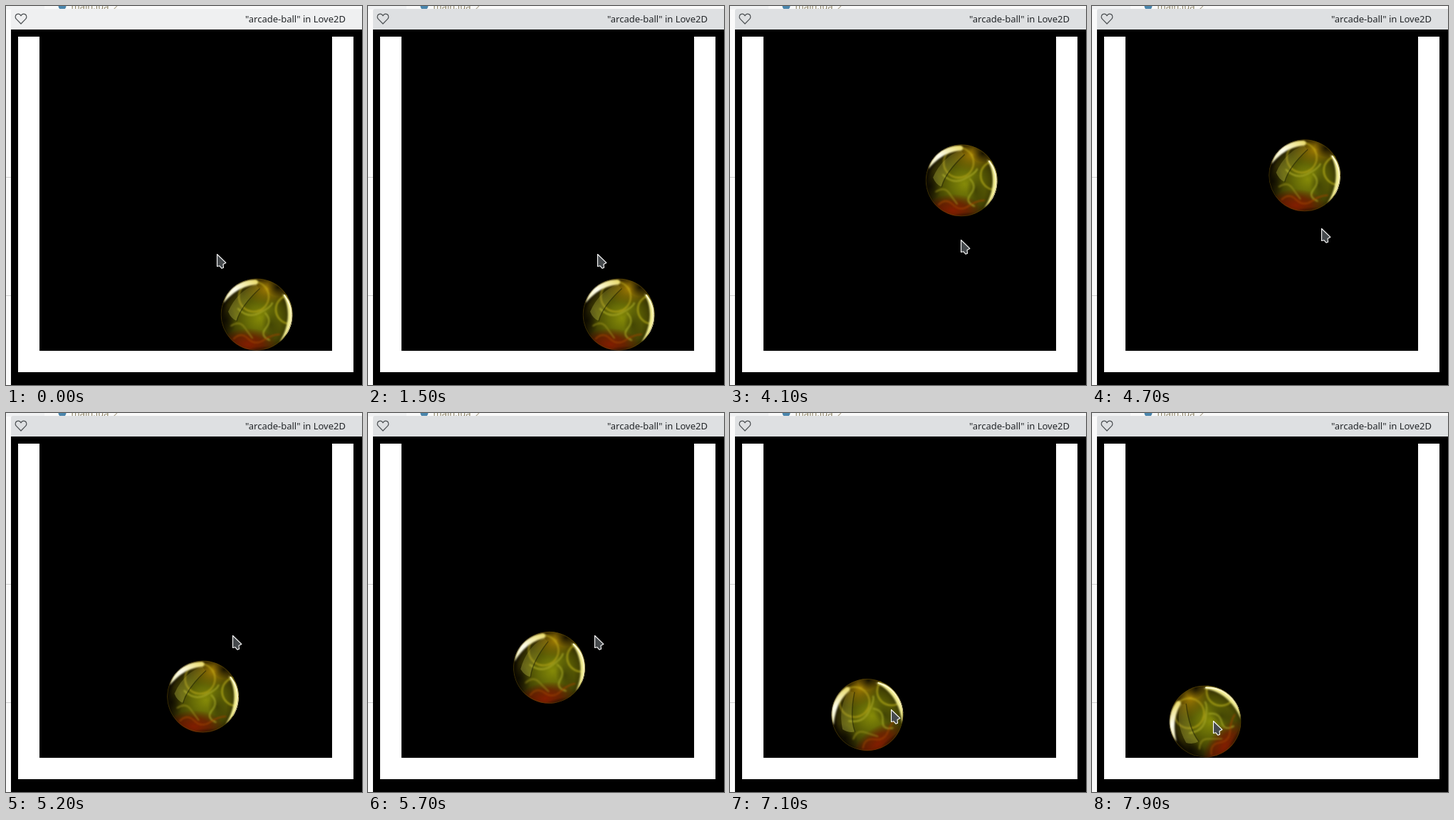
An HTML page for the animation above (8000 ms loop, 500 by 532 pixels).

```html
<!DOCTYPE html>
<html lang="en">
<head>
<meta charset="utf-8">
<title>arcade-ball</title>
<style>
  html, body { margin: 0; width: 100%; height: 100%; overflow: hidden; background: #fafafa; }
  svg { display: block; width: 500px; height: 532px; }
  text { font: 13px "Noto Sans", "Open Sans", sans-serif; white-space: pre; }
  .line { fill: none; stroke-linecap: round; }
</style>
</head>
<body>
<svg viewBox="0 0 500 532" xmlns="http://www.w3.org/2000/svg">
  <defs>
    <radialGradient id="glass" cx="54%" cy="55%" r="52%">
      <stop offset="0" stop-color="#858a08"/>
      <stop offset=".35" stop-color="#666b06"/>
      <stop offset=".7" stop-color="#454503"/>
      <stop offset=".92" stop-color="#2a2502"/>
      <stop offset="1" stop-color="#120e00"/>
    </radialGradient>
    <radialGradient id="red">
      <stop offset="0" stop-color="#861c00" stop-opacity=".95"/>
      <stop offset=".5" stop-color="#701800" stop-opacity=".75"/>
      <stop offset="1" stop-color="#601400" stop-opacity="0"/>
    </radialGradient>
    <radialGradient id="gold">
      <stop offset="0" stop-color="#b98d05" stop-opacity=".85"/>
      <stop offset="1" stop-color="#8a6500" stop-opacity="0"/>
    </radialGradient>
    <radialGradient id="dark">
      <stop offset="0" stop-color="#0a0800" stop-opacity=".85"/>
      <stop offset="1" stop-color="#0a0800" stop-opacity="0"/>
    </radialGradient>
    <linearGradient id="shine" x1="0" y1="1" x2="1" y2="0">
      <stop offset="0" stop-color="#f4f0b0"/>
      <stop offset=".45" stop-color="#ffffee"/>
      <stop offset="1" stop-color="#e8d860"/>
    </linearGradient>
    <linearGradient id="pane" x1="0" y1="1" x2="1" y2="0">
      <stop offset="0" stop-color="#b4b840" stop-opacity=".42"/>
      <stop offset="1" stop-color="#c8b840" stop-opacity=".12"/>
    </linearGradient>
    <filter id="soft" x="-30%" y="-30%" width="160%" height="160%"><feGaussianBlur stdDeviation="1"/></filter>
    <clipPath id="disc"><circle r="50.5"/></clipPath>
  </defs>

  <rect width="500" height="532" fill="#fafafa"/>
  <rect width="54" height="5" fill="#f1f2f3"/>
  <circle cx="79" cy="0" r="5.5" fill="#4a86ad"/>
  <text x="91.5" y="5" fill="#8f8668">main.lua</text>
  <text x="150.5" y="5" fill="#a39a80">2</text>
  <path d="M0 240.5H7M0 406.5H7" stroke="#cfcfcf"/>

  <path id="bar" d="M7 33V7Q7 4 10 4H500V33Z"/>
  <path class="line" stroke="#4a4e51" stroke-width="1.2" stroke-linejoin="round"
    d="M21 25L14.3 18.2C12.4 16 13 12.7 15.2 11.6C17.4 10.5 19.8 11.4 21 13.8C22.2 11.4 24.6 10.5 26.8 11.6C29 12.7 29.6 16 27.7 18.2Z"/>
  <text x="336" y="23" fill="#232629">"arcade-ball" in Love2D</text>

  <rect x="7" y="33" width="493" height="499"/>
  <path d="M17 43H47V484H458V43H488V514H17Z" fill="#fff"/>

  <g id="ball"><g clip-path="url(#disc)">
    <circle r="50.5" fill="url(#glass)"/>
    <ellipse cx="16" cy="-36" rx="36" ry="24" fill="url(#gold)"/>
    <ellipse cx="-45" cy="8" rx="17" ry="22" fill="url(#dark)"/>
    <ellipse cx="30" cy="-38" rx="16" ry="13" fill="url(#dark)"/>
    <ellipse cx="20" cy="14" rx="13" ry="22" fill="url(#dark)" opacity=".45"/>
    <ellipse cx="-12" cy="42" rx="42" ry="23" fill="url(#red)"/>
    <ellipse cx="10" cy="54" rx="28" ry="10" fill="url(#dark)"/>
    <g class="line" filter="url(#soft)">
      <circle cx="-4" cy="-25" r="21" stroke="#c8b21c" stroke-width="2.2" opacity=".6"/>
      <circle cx="47" cy="-7" r="20" stroke="#c4b820" stroke-width="2.4" opacity=".65"/>
      <path d="M-26 -8Q-12 6 4 -2T22 -16" stroke="#a0a020" stroke-width="2"/>
      <path d="M12 -2Q22 8 13 19T18 36" stroke="#b0b42a" stroke-width="2" opacity=".7"/>
      <path d="M-36 16Q-24 8 -17 18T-6 33" stroke="#a29a20" stroke-width="1.8" opacity=".65"/>
      <path d="M-32 34Q-22 24 -12 34T10 36T32 28" stroke="#a04408" stroke-width="2" opacity=".7"/>
    </g>
    <path d="M-40 -4Q-36 6 -28 9Q-22 -12 4 -36L-1 -42Q-27 -33 -40 -4Z" fill="url(#pane)"/>
    <path class="line" d="M-28 9Q-22 -12 4 -36" stroke="#17180280" stroke-width="1.5"/>
    <path d="M-46.5 -16C-42 -36 -24 -49 -1 -49Q5 -46 0 -42C-21 -40 -32 -32 -46.5 -16Z" fill="url(#shine)" filter="url(#soft)"/>
    <path d="M36 -29C55 -20 59 20 32 39C45 19 49 -8 36 -29Z" fill="#f3ee92" filter="url(#soft)"/>
    <path class="line" d="M39 -27Q57 -3 43 27" stroke="#fffbd0" stroke-width="2"/>
    <circle class="line" r="50" stroke="#5f4a05" opacity=".55"/>
  </g></g>

  <path id="arrow" d="M.5 .5V17.5L4 16.8L7 20.3L9.5 19.2L9 14.5L12.8 12.4Z"
    fill="#464a4d" stroke="#fff" stroke-width="1.1" stroke-linejoin="round"/>
</svg>
<script>
const LOOP = 8000, STEP = 100;
const FLOOR = 433, FALL = 302, LAUNCH = 3.568, BOUNCE = 0.595;
const byId = id => document.getElementById(id);
const bar = byId("bar"), ball = byId("ball"), arrow = byId("arrow");

// Rows: seconds, then values
const ballX = [[3.4, 352], [3.5, 351.6], [7, 197], [7.9, 159]];
const spin = [[5.27, 0], [5.7, -9], [7.1, -36], [7.9, -54]];
const pointer = [
  [0.5, 296, 348], [0.8, 321, 349], [1.2, 321, 349], [1.5, 322, 348],
  [1.8, 314, 310], [2.1, 304, 278], [2.2, 305, 277], [2.6, 305, 277],
  [2.9, 318, 325], [3.2, 328, 367], [3.6, 328, 367], [4.3, 322, 312],
  [4.7, 322, 312], [5.1, 318, 312], [6.2, 318, 312], [6.6, 291, 347],
  [7, 242, 402], [7.1, 226, 416], [7.4, 190, 429], [7.9, 170, 432]
];

function at(rows, t) {
  const i = rows.findIndex(row => row[0] > t);
  if (i === 0) return rows[0].slice(1);
  if (i < 0) return rows[rows.length - 1].slice(1);
  const [a, b] = [rows[i - 1], rows[i]];
  const k = (t - a[0]) / (b[0] - a[0]);
  return a.slice(1).map((v, j) => v + (b[j + 1] - v) * k);
}

// Parabolic hops, each shorter by a fixed ratio
function ballY(t) {
  if (t < 3.5) return FLOOR;
  if (t < LAUNCH) return FLOOR - 1;
  let start = LAUNCH, half = 0.8515;
  while (half > 0.02) {
    if (t < start + 2 * half) {
      const d = t - start - half;
      return FLOOR - FALL * (half * half - d * d);
    }
    start += 2 * half;
    half *= BOUNCE;
  }
  return FLOOR;
}

function draw(now) {
  const t = Math.floor((now % LOOP) / STEP) * STEP / 1000;
  const [x] = at(ballX, t), [angle] = at(spin, t);
  const [px, py] = at(pointer, t).map(Math.round);
  bar.setAttribute("fill", t < 1 ? "#eff0f1" : "#dee0e2");
  ball.setAttribute("transform", `translate(${x} ${ballY(t)}) rotate(${angle})`);
  arrow.setAttribute("transform", `translate(${px} ${py})`);
}

const begin = performance.now();
function tick() {
  draw(performance.now() - begin);
  requestAnimationFrame(tick);
}
tick();
</script>
</body>
</html>
```
